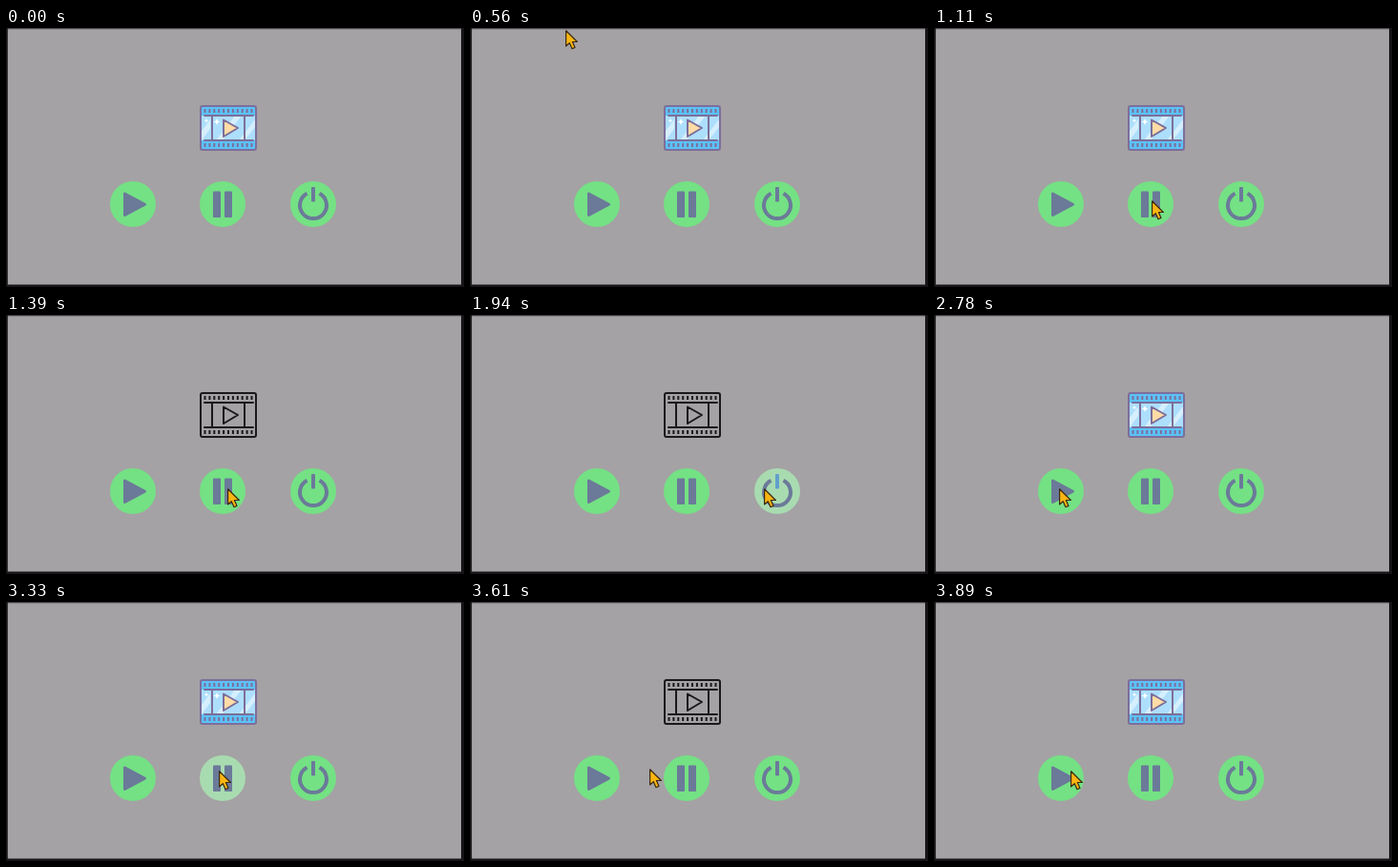
Animation of 480x272 px, one loop 4170 ms. Source, as an HTML page:

```html
<!DOCTYPE html>
<html lang="en">
<head>
<meta charset="utf-8">
<title>Player buttons</title>
<style>
  html, body { margin: 0; width: 100%; height: 100%; overflow: hidden; background: #a4a2a4; }
  svg { display: block; width: 100%; height: 100%; }
  .disc { fill: #74e184; }
  .glyph { fill: #6b7a99; stroke: #6b7a99; stroke-linejoin: round; }
  .ring { fill: none; stroke: #6b7a99; stroke-width: 4; }
  .hover .disc { fill: #a9dbb1; }
  .hover .stem { fill: #61a0cb; stroke: #61a0cb; }
  .line { fill: none; stroke-width: 2; stroke-linejoin: round; stroke-linecap: round; }
  .holes { fill: none; stroke-width: 2; }
</style>
</head>
<body>
<svg viewBox="0 0 480 272" preserveAspectRatio="none">
  <defs>
    <g id="film">
      <rect class="line" x="204" y="82" width="58" height="46" rx="2"/>
      <path class="line" d="M208 92H259M208 118H259M216 92V118M250 92V118M228 96.5L243 105L228 114Z"/>
      <path class="holes" stroke-dasharray="2 2.9" d="M207.5 87H260M207.5 123H260" style="stroke-width:4"/>
    </g>
    <clipPath id="pane"><rect x="205" y="92" width="56" height="26"/></clipPath>
  </defs>

  <rect width="480" height="272" fill="#a4a2a4"/>
  <path fill="#4b484b" d="M0 0H480V1.2H0Z"/>
  <path fill="#181518" d="M0 0H1.8V272H0ZM477 0H480V272H477ZM0 269.4H480V272H0Z"/>

  <g id="color">
    <rect x="204" y="82" width="58" height="46" rx="2" fill="#5bc2f8"/>
    <rect x="205" y="92" width="56" height="26" fill="#addffd"/>
    <g clip-path="url(#pane)" fill="#d6effd">
      <path d="M205 108L214 96V106L205 118ZM220 118L240 92H247L227 118ZM244 118L261 96V104L250 118Z"/>
    </g>
    <path fill="#fff" d="M221 95l1 2.5 2.5 1-2.5 1-1 2.5-1-2.5-2.5-1 2.5-1ZM210 95l.7 1.5 1.5.7-1.5.7-.7 1.5-.7-1.5-1.5-.7 1.5-.7Z"/>
    <path fill="#ffdca6" d="M228 96.5L243 105L228 114Z"/>
    <use href="#film" stroke="#7d6e9b"/>
  </g>
  <use id="outline" href="#film" stroke="#1a181a"/>
  <g id="solid">
    <rect x="206" y="84" width="54" height="42" fill="#000"/>
    <path fill="#a4a2a4" d="M227 96L244 105.5L227 116Z"/>
    <path fill="none" stroke="#a4a2a4" stroke-width="4" stroke-dasharray="4 3.8" d="M212 87V123M254 87V123"/>
  </g>

  <g id="play">
    <circle class="disc" cx="133" cy="185" r="24"/>
    <path class="glyph" stroke-width="3" d="M124.5 174V196.500L145.500 185.200Z"/>
  </g>
  <g id="pause">
    <circle class="disc" cx="227" cy="185" r="24"/>
    <path class="glyph" d="M217.500 172H224.500V198.500H217.500ZM229.500 172H236.500V198.500H229.500Z"/>
  </g>
  <g id="power">
    <circle class="disc" cx="322" cy="185" r="24"/>
    <path class="ring" d="M315.500 173.700A14 14 0 1 0 328.500 173.700"/>
    <rect class="glyph stem" x="320.500" y="167.500" width="3" height="14.500"/>
  </g>

  <path id="cursor" fill="#fab512" stroke="#3a2a12" stroke-width="1.2" stroke-linejoin="round"
    d="M.6.8V17L4.300 13.700L7 19.700L10 18.400L7.400 12.500H12.400Z"/>
</svg>
<script>
const LOOP = 4170;
// start time, cursor x, cursor y, icon, hovered button
const steps = [
  [0, null, 0, "color"],
  [560, 100, 2, "color"],
  [830, 139, 178, "color"],
  [1110, 228, 181, "color"],
  [1390, 232, 182, "outline"],
  [1670, 302, 172, "outline"],
  [1940, 308, 182, "outline", "power"],
  [2220, 218, 181, "solid"],
  [2500, 111, 193, "solid"],
  [2780, 131, 182, "color"],
  [3060, 176, 180, "color"],
  [3330, 223, 177, "color", "pause"],
  [3610, 188, 175, "outline"],
  [3890, 143, 177, "color"]
];
const el = id => document.getElementById(id);
const show = (node, on) => node.setAttribute("visibility", on ? "visible" : "hidden");
const icons = ["color", "outline", "solid"].map(el);
const buttons = ["play", "pause", "power"].map(el);
const cursor = el("cursor");

function draw(time) {
  const [, x, y, icon, hover] = steps.filter(s => s[0] <= time).pop();
  icons.forEach(n => show(n, n.id === icon));
  buttons.forEach(n => n.classList.toggle("hover", n.id === hover));
  show(cursor, x !== null);
  cursor.setAttribute("transform", `translate(${x || 0} ${y})`);
}

const start = performance.now();
function tick() {
  draw((performance.now() - start) % LOOP);
  requestAnimationFrame(tick);
}
draw(0);
requestAnimationFrame(tick);
</script>
</body>
</html>
```
